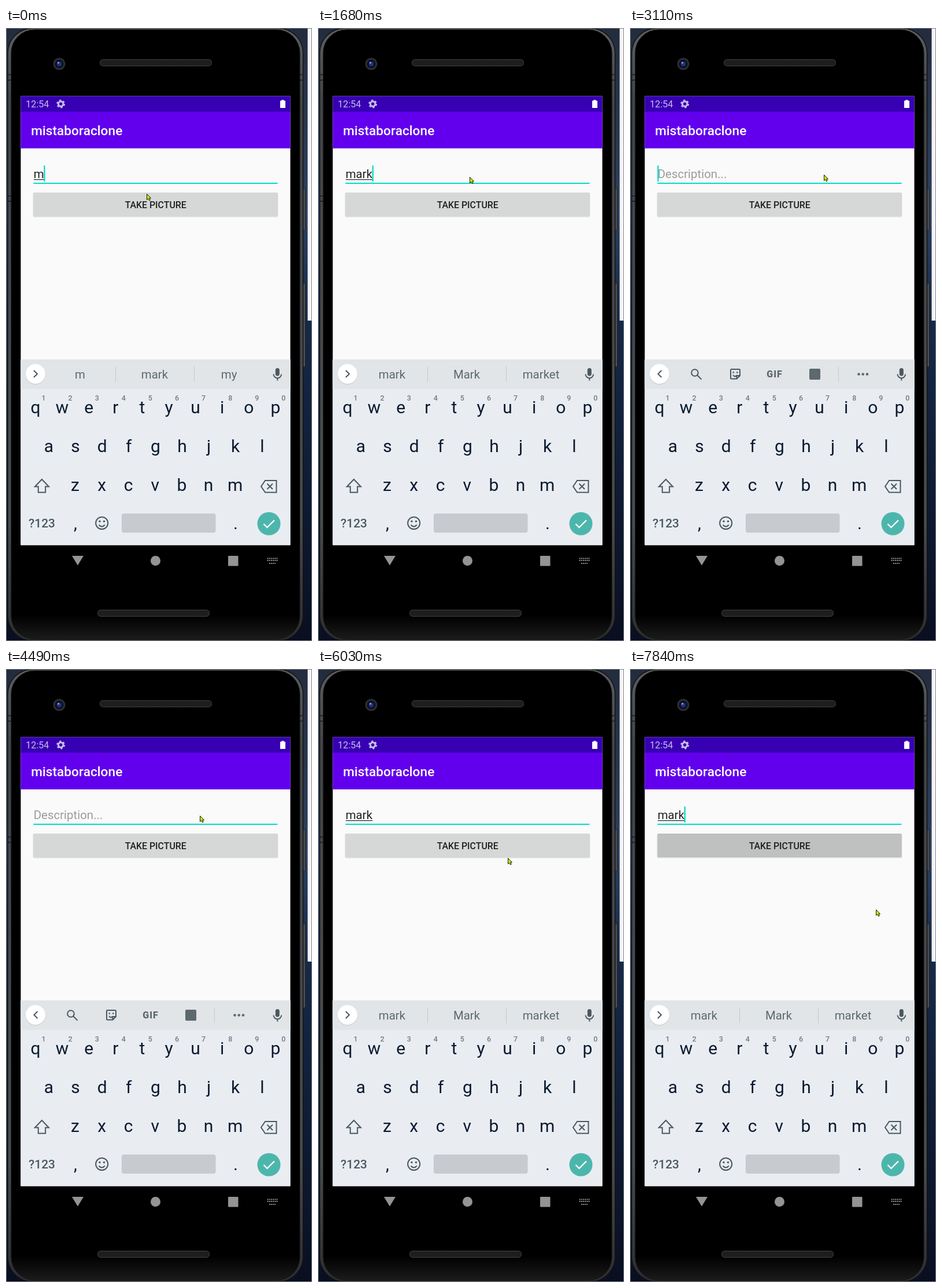
These frames come from a looping animation (529 px wide and 1058 px high, 7990 ms). An HTML page:

```html
<!DOCTYPE html>
<html lang="en">
<head>
<meta charset="utf-8">
<title>Typing on a phone</title>
<style>
  html, body { margin: 0; width: 100%; height: 100%; overflow: hidden; background: #10192c; }
  svg { display: block; width: 529px; height: 1058px; font-family: Roboto, sans-serif; }
  .mid { text-anchor: middle; }
  .key { font-size: 30px; fill: #0b1930; text-anchor: middle; }
  .hint { font-size: 12.5px; font-weight: 500; fill: #727a82; text-anchor: middle; }
  .word { font-size: 20.45px; fill: #5c696f; text-anchor: middle; }
  .line { fill: none; stroke: #4a5861; stroke-width: 2; }
</style>
</head>
<body>
<svg viewBox="0 0 529 1058">
  <defs>
    <linearGradient id="sky" x2="0" y2="1">
      <stop stop-color="#232c3d"/><stop offset=".3" stop-color="#2b405f"/>
      <stop offset=".48" stop-color="#162948"/><stop offset="1" stop-color="#090f20"/>
    </linearGradient>
    <linearGradient id="metal" x2="0" y2="1">
      <stop stop-color="#5c5e60"/><stop offset=".12" stop-color="#434548"/>
      <stop offset=".8" stop-color="#4b4d4f"/><stop offset="1" stop-color="#2c2d2e"/>
    </linearGradient>
    <linearGradient id="chin" x2="0" y2="1">
      <stop offset=".96" stop-color="#000"/><stop offset="1" stop-color="#1b1b1b"/>
    </linearGradient>
    <pattern id="mesh" width="4" height="4" patternUnits="userSpaceOnUse">
      <rect width="4" height="4" fill="#222"/><path d="M0 4 4 0" stroke="#111"/>
    </pattern>
    <clipPath id="buttonArea"><rect x="47.5" y="284" width="422" height="41" rx="2"/></clipPath>
  </defs>

  <!-- desktop and phone body -->
  <rect width="529" height="1058" fill="url(#sky)"/>
  <rect x="521.5" width="8" height="505" fill="#f5f3f4"/>
  <g fill="#4b4e51" stroke="#222">
    <rect x="509" y="277" width="8.500" height="72" rx="2"/>
    <rect x="509" y="440" width="8.500" height="145" rx="2"/>
  </g>
  <rect x="3" y=".5" width="510.500" height="1057" rx="43" fill="url(#metal)" stroke="#121314" stroke-width="1.500"/>
  <path d="M3 80.500h7M3 90h7M3 290h7M3 299h7M507 80.500h7M507 90h7" stroke="#191a1b" stroke-width="1.500"/>
  <rect x="9" y="3" width="499" height="1052" rx="40" fill="url(#chin)" stroke="#151515"/>
  <rect x=".5" y=".5" width="528" height="1057" fill="none" stroke="#7d858e"/>
  <g fill="url(#mesh)" stroke="#414141">
    <rect x="162.500" y="54.500" width="193" height="11" rx="5"/>
    <rect x="158.500" y="1004.500" width="193" height="11" rx="5"/>
  </g>
  <circle cx="92" cy="62" r="10.500" fill="#2e2e31"/>
  <circle cx="92" cy="62" r="7.500" fill="#0c1029"/>
  <circle cx="92" cy="62" r="4" fill="#22347f"/>
  <circle cx="90.500" cy="60" r="1.600" fill="#8fa5e4"/>

  <!-- app -->
  <rect x="25.500" y="117.500" width="466" height="775" fill="#fafafa"/>
  <rect x="25.500" y="117.500" width="466" height="27.500" fill="#3700b3"/>
  <rect x="25.500" y="144.500" width="466" height="63.200" fill="#6200ee"/>
  <text x="34.300" y="137.300" font-size="16.100" fill="#c9bde9">12:54</text>
  <g fill="none" stroke="#c9bde9">
    <circle cx="94.700" cy="131" r="4.200" stroke-width="3"/>
    <circle cx="94.700" cy="131" r="6.200" stroke-width="2.400" stroke-dasharray="3.250 3.243"/>
  </g>
  <path d="M476.500 124h3.800v1.500h2.700v12.500h-9v-12.500h2.500z" fill="#fff"/>
  <text x="43.200" y="185" font-size="22.700" font-weight="500" fill="#fff">mistaboraclone</text>

  <rect x="47.500" y="267" width="422" height="2" fill="#03dac5"/>
  <text id="field" x="47.700" y="259" font-size="20.450"></text>
  <rect id="underline" x="48" y="261" height="1.200" fill="#222"/>
  <rect id="caret" y="237.300" width="2.200" height="27.700" fill="#03dac5"/>

  <rect x="46.500" y="284.500" width="424" height="42" rx="3" fill="#e3e3e3"/>
  <rect x="47" y="284" width="423" height="41.500" rx="2" fill="#d6d7d7"/>
  <circle id="ripple" cx="328" cy="311" clip-path="url(#buttonArea)"/>
  <text class="mid" x="258.700" y="310.500" font-size="15.900" font-weight="500" fill="#1f1f1f">TAKE PICTURE</text>

  <!-- keyboard -->
  <rect x="25.500" y="572" width="466" height="320.500" fill="#e9edf1"/>
  <rect x="25.500" y="572" width="466" height="51" fill="#e1e5e8"/>
  <circle cx="51" cy="598" r="17.500" fill="#cdd2d5"/>
  <circle cx="51" cy="597" r="17" fill="#fff"/>
  <path id="chevron" class="line"/>
  <g fill="#4a5861">
    <rect x="465.800" y="587" width="7" height="13.500" rx="3.500"/>
    <path class="line" d="M462.500 597.500a6.800 6.800 0 0 0 13.600 0M469.300 604v4.500"/>
  </g>
  <g id="words">
    <path d="M189.500 584v27M325.500 584v27" stroke="#c3c9cd"/>
    <text class="word" x="128" y="605"></text>
    <text class="word" x="257" y="605"></text>
    <text class="word" x="385.500" y="605"></text>
  </g>
  <g id="tools" fill="#5c696f">
    <circle class="line" cx="112" cy="595" r="5.800"/>
    <path class="line" d="M116 599l7.500 7.500" stroke-width="2.500"/>
    <path class="line" d="M175.500 589h13q1.500 0 1.500 1.500v9.500l-5.500 5.500h-9q-1.500 0-1.500-1.500v-13.500q0-1.500 1.500-1.500zM189.500 600h-5v5M178 599q3 4 6 1"/>
    <circle cx="178.800" cy="594.500" r="1.400"/><circle cx="185.300" cy="594.500" r="1.400"/>
    <text class="mid" x="250" y="602.800" font-size="16" font-weight="900" letter-spacing="1">GIF</text>
    <rect x="310" y="588" width="19" height="19" rx="2"/>
    <path d="M360.500 584v27" stroke="#c3c9cd"/>
    <circle cx="395.500" cy="597.500" r="2.300"/><circle cx="402.700" cy="597.500" r="2.300"/><circle cx="410" cy="597.500" r="2.300"/>
  </g>
  <g id="keys"></g>
  <path class="line" d="M62 779l12 12.500h-5.800v10h-12.400v-10h-5.800z"/>
  <path class="line" d="M448 781h19.500v20.500h-19.500l-7-10.250zM451.500 786.500l9.500 9.500M461 786.500l-9.500 9.500"/>
  <text class="mid" x="62" y="862" font-size="21" font-weight="500" fill="#4a5861">?123</text>
  <circle class="line" cx="165.700" cy="854.500" r="10.500"/>
  <path class="line" d="M160.500 857.500q5.200 6 10.400 0"/>
  <g fill="#4a5861"><circle cx="162" cy="851.500" r="1.700"/><circle cx="169.500" cy="851.500" r="1.700"/></g>
  <rect x="200" y="838" width="162.500" height="33" rx="4" fill="#c7cbd0"/>
  <circle cx="454.500" cy="855.500" r="20" fill="#4db6ac"/>
  <path d="M445.500 856l6 6 12.500-12.500" fill="none" stroke="#fff" stroke-width="2.200"/>

  <!-- navigation -->
  <g fill="#949494">
    <path d="M114 911h20l-10 16.500z"/>
    <circle cx="258.500" cy="919.500" r="8.500"/>
    <rect x="384" y="911" width="17.500" height="17.500" rx="1"/>
    <path d="M451.500 915.500h18M451.500 919h18M455 924h11" stroke="#949494" stroke-width="2" stroke-dasharray="2 1.200"/>
  </g>
  <path id="mouse" d="M.5.500v10l2.300-2.100 1.700 3.400 1.800-.8-1.600-3.300h2.800z" fill="#c6ef00" stroke="#1c2200"/>
</svg>
<script>
const $ = id => document.getElementById(id);
const LOOP = 7990;

const addText = (cls, x, y, text) =>
  `<text class="${cls}" x="${x}" y="${y}">${text}</text>`;
const row = (letters, x, y, cls = 'key') =>
  [...letters].map((c, i) => addText(cls, x + i * 46.1, y, c)).join('');
$('keys').innerHTML =
  row('qwertyuiop', 51, 665) + row('1234567890', 65, 643, 'hint') +
  row('asdfghjkl', 74, 732) + row('zxcvbnm', 119.5, 799) +
  addText('key', 120, 865, ',') + addText('key', 397, 865, '.');

// each entry: start time, then values held until the next entry
const typed = [[0, 'm'], [140, 'mar'], [290, 'mark'], [2540, 'mar'], [2690, 'ma'],
  [2840, 'm'], [2990, ''], [5020, 'm'], [5150, 'mar'], [5290, 'mark']];
const suggestions = [[0, 'm mark my'], [140, 'mar mark mary'], [290, 'mark Mark market'],
  [2540, 'mar mark mary'], [2840, 'ma mark March'], [3110, ''],
  [5020, 'm mark my'], [5150, 'mar mark mary'], [5290, 'mark Mark market']];
const caretOn = [[0, 1], [740, 0], [1280, 1], [1830, 0], [2220, 1], [3530, 0],
  [3930, 1], [4490, 0], [5020, 1], [5750, 0], [6300, 1]];
const mouse = [[0, 243, 286], [1280, 248, 270], [1410, 231, 241], [1550, 245, 247],
  [1680, 262, 257], [1830, 335, 253], [5880, 328, 308], [6030, 328, 326],
  [6700, 363, 273], [7480, 377, 324], [7600, 403, 398], [7720, 421, 450], [7840, 425, 415]];
const ripple = [[0, 0, '#b9baba'], [6300, 249, '#b9baba'], [6420, 300, '#bfc1c0']];

const at = (track, t) => track.findLast(step => step[0] <= t).slice(1);
const show = (el, on) => el.setAttribute('visibility', on ? 'visible' : 'hidden');
const slots = $('words').querySelectorAll('text');

function draw(t) {
  const [text] = at(typed, t);
  const field = $('field');
  field.textContent = text || 'Description...';
  field.setAttribute('fill', text ? '#222' : '#9b9b9b');
  const width = text ? field.getComputedTextLength() : 0;
  $('underline').setAttribute('width', width);
  $('caret').setAttribute('x', 47.4 + width);
  show($('caret'), at(caretOn, t)[0]);

  const [bar] = at(suggestions, t);
  const words = bar.split(' ');
  slots.forEach((slot, i) => slot.textContent = words[i] || '');
  show($('words'), bar);
  show($('tools'), !bar);
  $('chevron').setAttribute('d', bar ? 'M48 591l6 6-6 6' : 'M54.500 591l-6 6 6 6');

  const [radius, color] = at(ripple, t);
  $('ripple').setAttribute('r', radius);
  $('ripple').setAttribute('fill', color);
  $('mouse').setAttribute('transform', `translate(${at(mouse, t)})`);
}

const start = performance.now();
function tick() {
  draw((performance.now() - start) % LOOP);
  requestAnimationFrame(tick);
}
tick();
</script>
</body>
</html>
```
